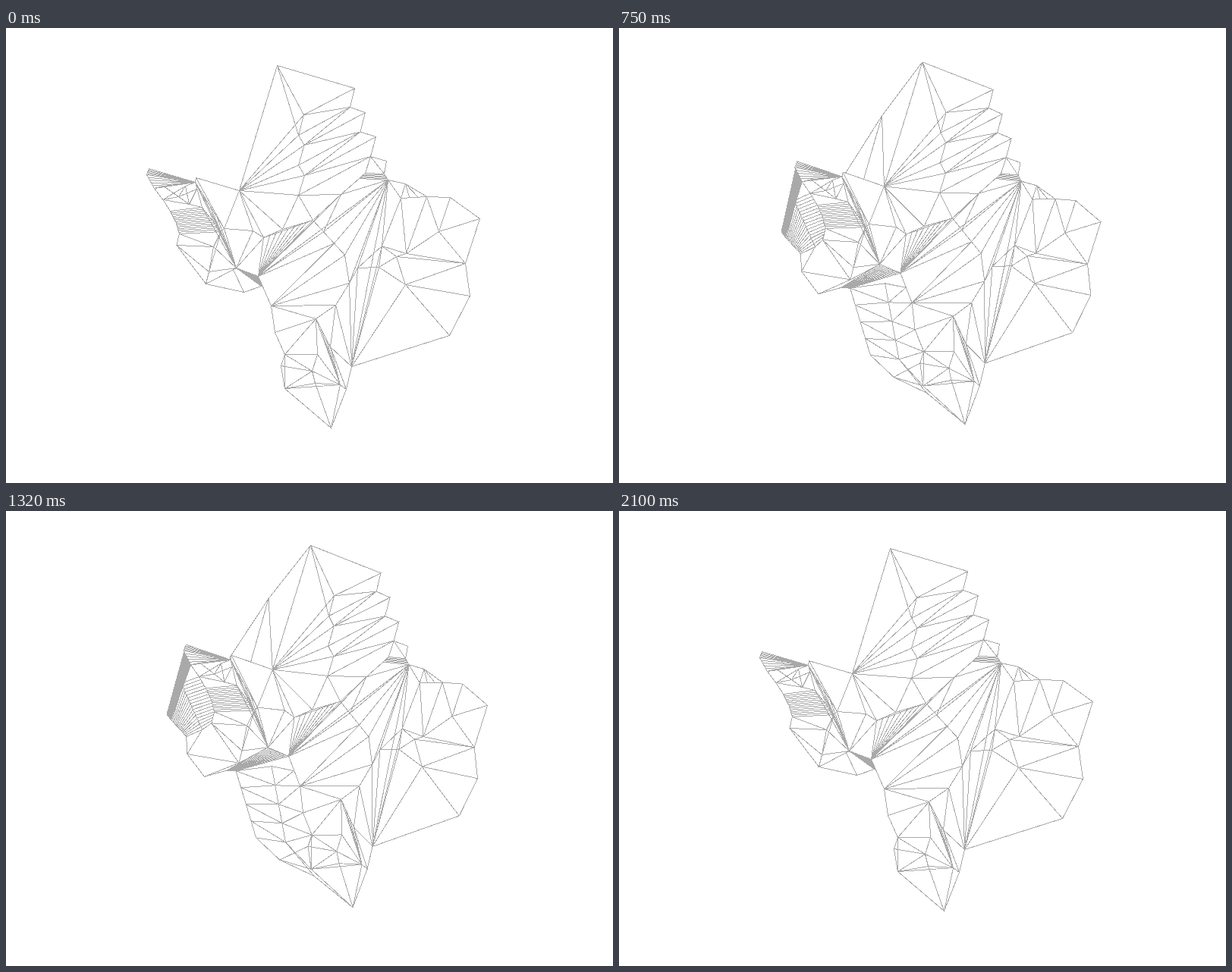
These frames come from a looping animation (800x600 px, 2.13 s). An HTML page:

```html
<!DOCTYPE html>
<html lang="en">
<head>
<meta charset="utf-8">
<title>Swaying wireframe</title>
<style>
html, body { margin: 0; width: 100%; height: 100%; overflow: hidden; background: #fff; }
svg { display: block; }
path { fill: none; stroke: #a9a9a9; stroke-width: 1; shape-rendering: crispEdges; }
#skin { fill: #fff; stroke: none; }
</style>
</head>
<body>
<svg width="800" height="600" viewBox="0 0 800 600">
  <path id="back"/>
  <path id="skin"/>
  <path id="front"/>
</svg>
<script>
const HALF = 1050, LOOP = 2130, STEP = 30;
const verts = {}, backLines = [], frontLines = [], backStrips = [], frontStrips = [];

const lerp = (a, b, f) => a + (b - a) * f;
const names = s => s.trim().split(/\s+/);

// Sideways travel of the near skin: a smooth bulge, closest at the left.
function bulge(x, y) {
  const d = x - 188;
  return 61 - .046 * d - .000184 * d * d + .024 * (270 - y);
}
function put(name, x, y, travel = bulge(x, y)) { verts[name] = { x, y, travel }; }
function series(name, ...pts) { pts.forEach((p, i) => put(name + i, ...p)); }
function rule(name, n, at) { for (let i = 0; i < n; i++) put(name + i, ...at(i)); }
function front(...lines) { frontLines.push(...lines.map(names)); }
function back(...lines) { backLines.push(...lines.map(names)); }
function fan(hub, ends) { names(ends).forEach(e => front(hub + ' ' + e)); }
function strip(list, a, b, n) { list.push([names(a), names(b), n]); }

// Stepped top: tips, notches, ridge and valley repeat at even steps.
put('A', 357, 49);
put('H', 307, 214);
rule('tip', 4, i => [459 + 14 * i, 79 + 32 * i]);
rule('notch', 3, i => [453 + 13.5 * i, 104 + 32.5 * i]);
rule('ridge', 3, i => [392 + .5 * i, 114 + 40 * i]);
rule('dip', 3, i => [385, 141 + 39.5 * i]);
for (let i = 0; i < 3; i++) {
  front(`ridge${i} tip${i} notch${i} tip${i + 1}`, `notch${i} ridge${i} dip${i} notch${i}`);
  if (i) front(`dip${i - 1} ridge${i} notch${i - 1}`);
  fan('H', `ridge${i} dip${i}`);
}
fan('A', 'ridge0 dip0');

// Knot beside the top
series('h', [498, 192], [473, 191], [465, 198]);
put('g', 441, 219);
front('notch2 h0 tip3', 'notch2 h1 h2 g', 'notch2 dip2 g r0');
strip(frontStrips, 'h1 h2', 'h0 r0', 5);

// Right wing
series('r', [503, 200], [526, 205], [554, 222], [585, 223], [624, 251],
  [605, 310], [611, 353], [584, 405], [455, 446]);
series('q', [520, 224], [570, 268], [495, 287], [527, 297],
  [514, 301], [526, 338], [491, 315], [463, 316]);
front('q0 q2 q3 q0 r2 q3 q1 r5 q3', 'r2 q1 r3', 'q1 r4', 'm4 q7 q6 q5',
  'q2 q4 q6 q2 q7', 'q3 q4 r5', 'q4 q5');
fan('q5', 'r5 r6 r7');
strip(frontStrips, 'r1 q0', 'q0 q0', 3);
strip(frontStrips, 'r1 r1', 'q0 r2', 3);

// Central fans
rule('m', 4, i => [404 + 14 * i, 253 + 15.3 * i]);
put('m4', 452, 336);
series('d', [287, 264], [325, 267], [339, 276], [364, 265]);
put('J', 303, 316);
put('P', 332, 327);
front('dip2 m0 m1 m2 m3 m4 s0', 'm0 g m1', 'd0 d1 d2 d3 m0 d2', 'd3 dip2',
  'w1 d0 J d1', 'd2 J w0', 'v1 J v2');
fan('H', 'd0 d1 d2 d3');
fan('r0', 'q0 q2 q7 r8 m1 m2 m3 m4 P');
fan('P', 'd2 m0 m1 m2 g');
fan('r8', 'm4 s0 q7 q6 q2 q5 s2');
fan('f1', 'm2 m3 m4 s0 s1');
strip(frontStrips, 'd2 m0', 'P P', 8);

// Leg: a left column f and the joints s
series('f', [340, 346], [349, 366], [354, 401], [367, 430], [367, 475]);
put('heel', 362, 445);
series('s', [434, 365], [408, 383], [427, 420], [410, 430], [403, 452],
  [407, 468], [440, 470], [448, 476], [428, 527]);
front('f2 s1 f3 s3 s4 f3', 's1 s3 s6', 's0 s1 s2 r8', 's0 s2 s7', 'heel s4 s5 s6 s4 f4 s5 s8 s7',
  'f4 s6 s7', 'f3 f4', 's8 s6');
strip(frontStrips, 's1 s2', 's6 s6', 3);

// Left wing: the rim curves inwards
series('z', [188, 185], [185, 193]);
rule('l', 6, i => {
  const y = 211 + 15 * i;
  return [228 - 33 * Math.abs((272 - y) / 61) ** 1.5, y];
});
series('w', [249, 203], [250, 197]);
series('v', [251, 212], [258, 236], [283, 268]);
series('y', [236, 208], [227, 222], [241, 232], [207, 208]);
series('o', [263, 337], [267, 321], [273, 288]);
front('l0 y3 w0 y0 y1 y3', 'l1 y0 y2 y1 l1 y2 v0 y1', 'y2 v1 l2', 'l5 o1 o0',
  'l5 o2 o1 J o2 l4', 'o2 v2 d0', 'v2 o1', 'w0 v1 v2 w0 d0');
strip(frontStrips, 'z0 z1 l0', 'w0 w0', 10);
strip(frontStrips, 'l2 l3 l4', 'v1 v2', 13);
strip(frontStrips, 'w0 d0', 'J J', 4);

// Far side, seen only when turned
series('x', [363, 115, -20], [358, 190, -75], [320, 228, -5]);
series('u', [281, 266, -80], [283, 273, -76], [298, 295, -70], [299, 318, -70],
  [313, 348, -60], [336, 340, -53]);
rule('c', 4, i => [242 + 9 * i, 230 + 20 * i, -10]);
rule('p', 5, i => [353 + 6.5 * i, 340 + 22 * i, -59]);
rule('e', 5, i => [367 + 4.5 * i, 336 + 25 * i, -20]);
put('p5', 398, 458, -45);
put('p6', 389, 483, 20);
back('A x0 x1 x2 x0 H', 'u0 u1 u2 u3 u4 o0 u3 c3 l5', 'c0 c1 c2 c3', 'u4 u5 p0 P',
  'p4 p5 p6 s8', 'heel p5 f4', 'e4 p6');
for (let i = 0; i < 5; i++) {
  back(`p${i} e${i} f${i}`);
  if (i) back(`p${i - 1} p${i}`, `e${i - 1} e${i} f${i - 1}`, `p${i - 1} e${i}`);
}
strip(backStrips, 'z0 l0', 'u0 u1', 24);
strip(backStrips, 'u1 u2', 'c0 c1 c2 c3', 16);
strip(backStrips, 'c0 c1 c2 c3', 'l1 l2 l3 l4 l5', 16);
strip(backStrips, 'J P', 'u5 p0', 11);

const outline = names(`A tip0 notch0 tip1 notch1 tip2 notch2 tip3 h0 r0 r1 r2 r3 r4 r5 r6 r7 r8
  s7 s8 f4 heel f3 f2 f1 P J o0 l5 l4 l3 l2 l1 l0 z1 z0 w0 w1 H A`);
frontLines.push(outline);

// Steady swing out and back, with a slight hesitation midway.
function turnAt(t) {
  const s = Math.max(0, 1 - Math.abs(t / HALF - 1));
  return 1.06 * s - .05 * Math.sin(Math.PI * s) * Math.cos(4 * Math.PI * s);
}

function project({ x, y, travel }, turn) {
  const swell = 4 * turn * (1 - turn), cx = x - 400, cy = y - 280;
  const shear = cx > 0
    ? .03 * cx - .00026 * cx * cy - .008 * cy
    : .022 * cx - .00012 * cx * cy - .004 * cy;
  const lift = -.5 - .095 * travel - .013 * Math.max(0, cx);
  const px = x + travel * turn;
  return [px + .035 * (px - 395) * swell + .5, y + shear * turn + lift * swell + .5];
}

function along(chain, f) {
  const s = f * (chain.length - 1), i = Math.min(Math.floor(s), chain.length - 2);
  return [0, 1].map(k => lerp(chain[i][k], chain[i + 1][k], s - i));
}

const paths = ['back', 'skin', 'front'].map(id => document.getElementById(id));

function draw(t) {
  const turn = turnAt(t), pos = {};
  for (const n in verts) pos[n] = project(verts[n], turn);
  const trace = pts => 'M' + pts.map(p => p.map(v => v.toFixed(2))).join('L');
  const line = list => trace(list.map(n => pos[n]));
  const rungs = ([a, b, n]) => {
    const [ca, cb] = [a, b].map(c => c.map(k => pos[k]));
    return Array.from({ length: n + 1 }, (_, i) => trace([along(ca, i / n), along(cb, i / n)])).join('');
  };
  const layer = (lines, strips) => lines.map(line).join('') + strips.map(rungs).join('');
  const shapes = [layer(backLines, backStrips), line(outline), layer(frontLines, frontStrips)];
  paths.forEach((p, i) => p.setAttribute('d', shapes[i]));
}

const start = performance.now();
function tick() {
  const t = (performance.now() - start) % LOOP;
  draw(Math.floor(t / STEP) * STEP);
  requestAnimationFrame(tick);
}
tick();
</script>
</body>
</html>
```
